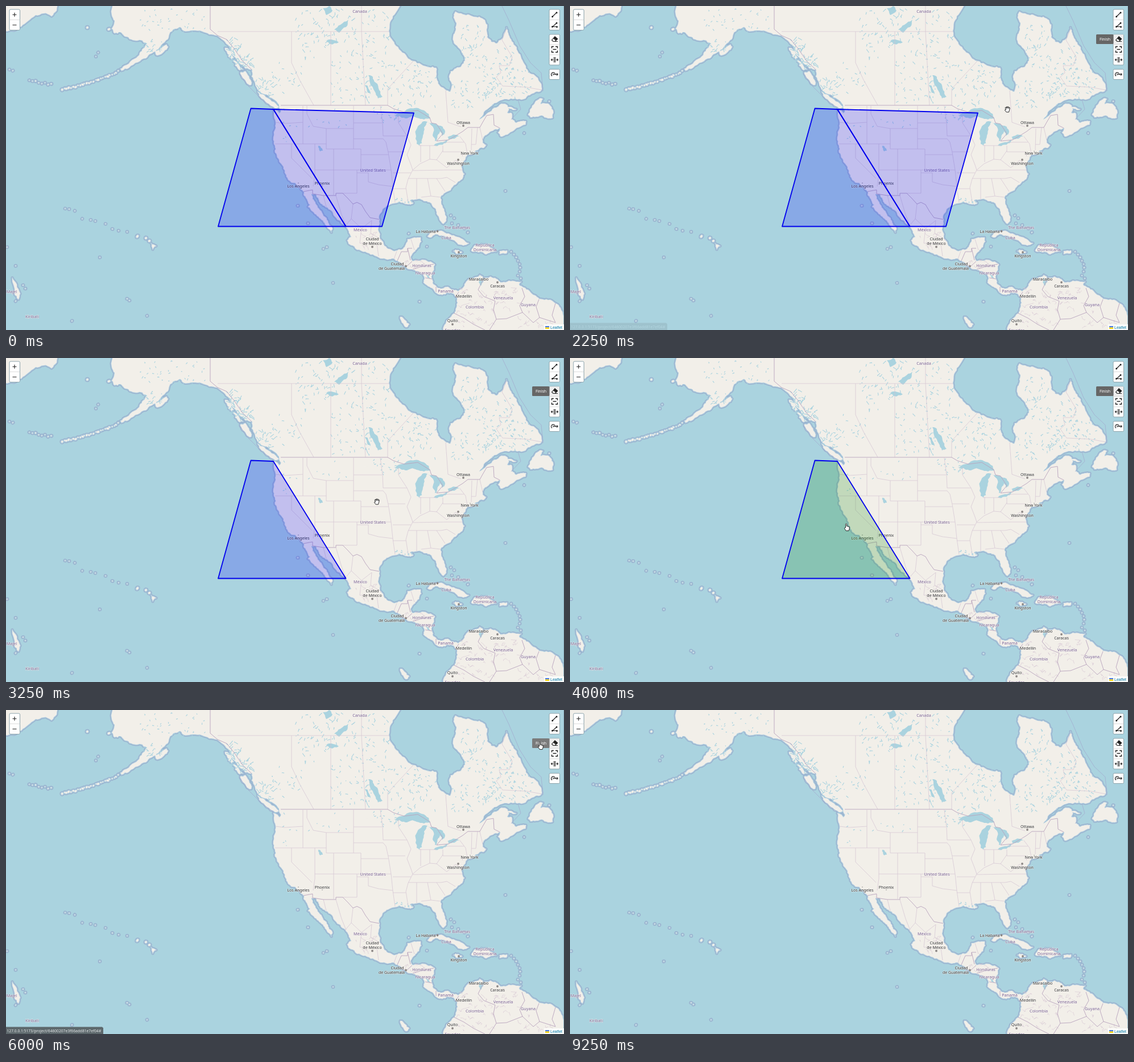
Animation, 981 px wide and 571 px high, one loop 9500 ms. Source, as an HTML page:

```html
<!DOCTYPE html>
<html lang="en">
<head>
<meta charset="utf-8">
<title>Map shape eraser</title>
<style>
html, body { margin: 0; width: 100%; height: 100%; overflow: hidden; background: #aad3df; }
svg { display: block; width: 981px; height: 571px; }
text { font: 7px "Noto Sans", sans-serif; }
.label { text-anchor: middle; fill: #333; stroke: #f7f5f2; stroke-opacity: .7; stroke-width: 1.2; paint-order: stroke; }
.country { font-size: 7.2px; fill: #7b6393; }
.states { fill: none; stroke: #d3c3d2; stroke-width: .7; }
.nations { fill: none; stroke: #b8a3bd; stroke-width: .9; }
.shape { stroke: #00e; stroke-width: 1.8; fill: #00f; fill-opacity: .2; stroke-linejoin: round; }
.shape.hot { fill: #008000; }
.box { fill: #fff; stroke: #8ea4ac; stroke-width: 1; }
.split { stroke: #ccc; stroke-width: .7; }
.icon { fill: none; stroke: #222; stroke-width: 1.1; }
.hand { fill: #fff; stroke: #111; stroke-width: .9; stroke-linejoin: round; }
</style>
</head>
<body>
<svg viewBox="0 0 981 571">
<defs>
<g id="land" stroke-linejoin="round">
<!-- Siberia, Alaska, western Canada -->
<polygon points="-9,-9 92,-9 89,8 80,18 66,13 52,16 38,27 27,36 14,43 -9,46"/>
<polygon points="190,-9 186,16 191,26 186,40 191,48 201,46 208,53 217,58 229,61 240,61 247,66 241,75 235,83 226,93 212,104 201,111 203,114 216,109 232,99 246,92 255,84 265,77 272,70 280,62 286,54 291,45 298,40 306,37 310,42 322,44 333,43 348,46 361,50 374,54 385,63 394,75 400,88 409,100 421,110 433,112 432,124 438,136 445,150 458,156 470,164 480,174 483,184 650,190 650,-9"/>
<polygon points="262,80 272,74 282,68 285,72 278,80 266,87"/>
<polygon points="412,117 421,115 427,124 431,139 424,137 416,127"/>
<polygon points="442,151 454,157 467,168 480,178 473,180 458,171 447,160"/>
<polygon points="385,74 392,77 400,91 397,94 391,86"/>
<polygon points="399,95 408,101 417,112 411,113 403,105"/>
<!-- Western United States and Mexico -->
<polygon points="480,172 484,182 480,189 476,184 470,182 471,191 474,204 473,218 470,236 473,246 473,258 479,269 484,278 488,284 490,293 495,303 500,309 509,312 516,318 523,327 540,332 545,332 549,338 552,346 560,352 567,358 575,365 581,374 589,382 598,390 603,400 607,407 600,413 604,420 614,427 628,433 641,438 655,443 668,446 678,445 690,448 694,430 684,432 672,428 664,420 657,405 654,394 656,380 657,367 662,358 672,351 700,344 700,172"/>
<polygon points="516,315 522,325 524,334 530,343 535,351 531,354 539,362 547,370 555,377 561,385 566,392 572,399 574,393 568,386 564,377 557,367 550,357 544,348 539,340 537,332 541,322"/>
<!-- Central and South America -->
<polygon points="670,446 678,445 688,449 697,456 706,463 716,465 726,468 734,473 736,480 734,487 741,493 749,497 757,506 767,509 777,505 787,507 794,514 806,506 795,503 786,500 777,495 767,498 757,495 750,488 748,478 750,468 754,456 749,452 738,448 725,449 714,449 712,445 714,437 720,430 726,425 730,415 729,408 718,408 706,411 703,420 698,428 684,432 676,430"/>
<polygon points="786,503 793,514 794,523 791,533 789,541 781,549 774,556 770,564 766,580 990,580 981,550 976,536 972,528 962,521 950,517 937,516 930,510 920,502 910,496 902,491 906,486 894,485 881,486 869,487 862,481 852,477 843,479 839,487 834,486 838,477 833,474 825,478 815,481 808,488 803,497 795,503"/>
<!-- Eastern United States and Maritimes -->
<polygon points="668,352 680,347 692,345 703,349 711,350 716,347 710,343 719,341 730,341 740,344 748,348 754,356 757,366 762,376 769,384 773,380 774,371 770,358 765,346 764,337 772,329 783,321 793,312 802,305 806,296 802,288 801,279 804,274 808,267 811,262 829,257 818,257 829,254 834,250 840,250 844,245 838,241 839,233 842,228 850,222 858,218 869,215 865,223 870,230 878,227 890,221 901,214 913,209 914,203 905,203 897,206 889,199 889,189 881,188 884,182 880,174 868,174 855,182 845,190 832,200 800,175 660,172"/>
<!-- Eastern Canada -->
<polygon points="697,-9 685,12 677,25 674,40 676,56 683,67 694,79 705,90 716,97 730,103 744,108 756,109 757,120 758,131 763,141 773,148 781,151 810,150 810,215 620,190 620,-9"/>
<polygon points="781,151 783,135 779,125 782,115 791,110 801,105 807,96 803,85 795,73 787,62 787,50 791,40 792,30 787,20 790,10 800,13 812,15 822,19 832,19 842,25 846,33 845,44 846,55 853,63 863,66 872,58 876,48 880,38 883,48 888,59 895,70 901,83 908,96 914,110 924,120 935,127 940,136 942,145 938,151 930,152 921,157 910,164 895,163 880,164 866,168 852,177 840,187 832,200 800,218 774,205 772,149"/>
<polygon points="918,192 921,184 925,176 932,167 938,163 944,164 940,173 950,172 958,177 962,185 961,197 953,198 945,194 932,195 922,196"/>
<polygon points="881,179 890,179 897,182 891,183"/>
<!-- Caribbean -->
<polygon points="741,406 750,398 765,396 778,401 790,406 803,411 814,418 807,421 795,420 785,412 770,405 755,402 746,408"/>
<polygon points="818,431 824,422 836,420 848,423 858,430 862,433 850,435 842,437 834,433 822,433"/>
<polygon points="786,432 795,430 802,434 793,437"/>
<polygon points="868,432 881,431 880,436 868,437"/>
<polygon points="255,418 264,423 258,429"/>
<polygon points="693,548 702,554 709,561 703,566 696,558"/>
<polygon points="11,479 19,491 25,507 22,517 15,506"/>
</g>
</defs>
<rect width="981" height="571" fill="#aad3df"/>
<use href="#land" fill="#98accb" stroke="#98accb" stroke-width="5"/>
<use href="#land" fill="#a9c8dc" stroke="#a9c8dc" stroke-width="3"/>
<use href="#land" fill="#f2efe9"/>
<path id="specks" fill="none" stroke="#aad3df" stroke-width="1.1"/>
<path id="veins" fill="none" stroke="#d6c5d2" stroke-width=".6"/>
<g id="lakes" fill="#aad3df">
<polygon points="682,193 695,187 708,181 718,180 731,183 743,190 746,198 735,200 722,197 712,195 702,198 692,194"/>
<polygon points="722,243 720,225 724,212 732,204 741,204 735,214 733,228 731,242 726,246"/>
<polygon points="742,205 755,207 768,213 772,222 767,229 763,221 760,226 757,237 754,238 750,228 752,216"/>
<polygon points="752,246 765,240 778,236 770,242 758,247"/>
<polygon points="776,231 790,227 798,229 788,234 778,235"/>
<polygon points="637,122 645,125 650,135 656,148 662,160 654,163 648,150 640,136"/>
<polygon points="631,137 636,141 641,156 636,153"/>
<polygon points="577,42 588,33 602,24 598,37 586,47"/>
<polygon points="557,4 568,0 574,8 563,16"/>
<polygon points="560,62 572,59 585,64 570,67"/>
<polygon points="549,246 553,248 557,255 552,256"/>
<polygon points="833,478 838,486 835,493 831,487"/>
<polygon points="737,472 743,475 746,481 741,479"/>
</g>
<path class="states" d="M372 45H674M502 45V100L516 130 541 175M571 45V175M625 0V45L632 175M671 175V146L716 97M773 149 777 205 800 213M880 40 872 60 881 75 890 90 885 105H867L870 118 862 125 873 141 915 143 942 148M474 205 490 207 522 205M522 176V243M473 243H563M502 243V268L538 304M543 243V297L540 318M543 289H677M576 252V333M563 216V252M529 176V190L540 212 563 216H611M611 176V252M563 252H624V289M611 206H661M611 234H663L668 240M658 176 662 206 663 229H705M624 262H672M668 240 672 258 677 289 680 318 684 346M617 289V330H592M617 294H637V310L655 315 680 318M672 257H702M690 192V206L705 229 712 245 705 262 712 280 715 289 707 305 703 320 707 345M680 322H703M680 294H712"/>
<path class="states" d="M715 290 775 289H803M707 304H765M722 304V341M741 304 747 335 730 337M747 335 764 337M729 245V275M745 246V270M726 246H757M715 289 728 278 745 270 757 271 768 255M768 246V257H800L803 265M765 304 775 302 790 311M757 304 772 327M757 271 775 285 790 272 803 279M798 230 808 243 811 260M819 216 818 254M829 214 826 244H818M833 214 838 236M768 240H805M558 334 563 354M580 334 590 368 598 388M610 349 607 375 625 392 643 378M607 375 596 388M625 392 622 418 652 419M643 378 641 400 660 412M652 419 655 441M687 432 682 446M712 411 718 430"/>
<path class="nations" d="M359 0V41L372 52 388 59 401 75 416 97 432 112M483 175H671L681 181 700 187 724 184 745 197 748 206 757 208 768 225 757 238 778 236 790 229 803 221 812 214H833L838 205 845 193 857 191 858 210 868 215M523 327 539 324V331L558 334H580V330H592L601 339 610 349 617 346 625 350 632 362 640 373 656 376M688 449 695 433H706V427H714M706 427 711 448M703 460 714 450M715 464 735 458 752 455M737 479 749 481M756 504V495M790 513 796 504M838 484 830 500 840 512 860 520 857 535 862 552 850 571M907 497 912 512 903 528 908 540 880 551 862 552M937 517 932 530 938 549 927 558 908 540M966 524 960 545 966 558 938 549M787 541 805 550 822 561 842 571"/>
<path fill="none" stroke="#a3adcf" stroke-width=".8" d="M872 0 884 25 903 70 922 100 941 118 944 150M410 118 425 140 450 165 471 180M888 200 905 182 900 165"/>
<g id="labels"></g>
<polygon id="east" class="shape" points="470,182 717,188.500 661,388.500 597.500,388.500"/>
<polygon id="west" class="shape" points="430.500,180.500 470,182 597.500,388.500 373,388.500"/>
<path d="M980.500 0V571" stroke="#8fb3c2" stroke-width="1"/>

<rect class="box" x="6" y="6" width="18.500" height="36.500" rx="2"/>
<path class="split" d="M6 24.300H24.500"/>
<path class="icon" d="M11.500 15.300H18.500M15 11.800V18.800M11.500 33.500H18.500"/>
<rect class="box" x="955" y="6" width="18.500" height="36.500" rx="2"/>
<rect class="box" x="955" y="50" width="18.500" height="54" rx="2"/>
<rect class="box" x="955" y="111.500" width="18.500" height="18" rx="2"/>
<rect id="armed" x="955.500" y="50.500" width="17.500" height="17.500" fill="#eee"/>
<path class="split" d="M955 24.300H973.500M955 68H973.500M955 86H973.500"/>
<g class="icon">
<path d="M961 18.500 967.500 12M961 36.500 967.500 30.500M961 36.500H968"/>
<g fill="#222" stroke="none"><circle cx="960.700" cy="18.700" r="1.500"/><circle cx="968" cy="11.700" r="1.500"/><circle cx="960.500" cy="36.500" r="1.500"/><circle cx="968" cy="30" r="1.500"/><circle cx="968.500" cy="36.800" r="1.500"/></g>
<path d="M959.500 60 965 54 969.500 58 965 62.500H962ZM964 62.500H970"/>
<path fill="#222" d="M962.500 57 965 54 969.500 58 967 60.500Z"/>
<path stroke-width="1.400" d="M959.500 74.500V71.500H963M966 71.500H969.500V74.500M969.500 78.500V81.500H966M963 81.500H959.500V78.500M961.500 76.500H967.500"/>
<path d="M963.500 90V99.500M965.500 90V99.500M958.500 94.800H962M967 94.800H970.500M960.500 92.800 958.500 94.800 960.500 96.800M968.500 92.800 970.500 94.800 968.500 96.800"/>
<path d="M960 123.500A3.500 3.500 0 1 1 965.500 121.500M963 120.500H970M968 118.500 970 120.500 968 122.500M962 122V119"/>
</g>
<g id="finish"><rect id="finishBox" x="925" y="50" width="30.500" height="17" rx="1.500"/><text x="940.500" y="61.200" fill="#fff" text-anchor="middle">Finish</text></g>
<rect x="946" y="561" width="35" height="10" fill="#fff" fill-opacity=".8"/>
<path d="M948 564h7v2.500h-7z" fill="#4c7be1"/><path d="M948 566.500h7v2.500h-7z" fill="#ffd500"/>
<text x="957" y="568.700" fill="#0078a8" style="font-family:'Liberation Sans',sans-serif">Leaflet</text>
<g id="status"><path d="M0 558.500H169L171 560.500V571H0Z" fill="#5d686c"/><text x="1.500" y="568" fill="#e4e8e9" style="font-size:6.700px">127.0.0.1:5173/project/64600207e3f66add81e7ef04#</text></g>
<g id="cursor" class="hand">
<path id="pointer" d="M-2.500 1V-5.500Q-1.500 -7.200 -.5 -5.500V-1.500L.8 -1.700 1 -1.200 2.500 -1.200 2.800 -.6 4.200 -.4V3L3 6.500H-1.800L-4.300 2.500Q-4.500 .5 -2.500 1Z"/>
<path id="grab" d="M-2.500 1 -3.800 -2.500Q-3.500 -4 -2.300 -3.300L-1.500 -1.500 -1.600 -4.200Q-.8 -5.500 0 -4.200L.3 -1.800 .8 -4.300Q1.800 -5.200 2.300 -4L2.200 -1.500 3 -3Q4.200 -3.500 4.300 -2.200L3.300 2.200 2.500 5H-1.800L-4.600 1.500Q-4.600 0 -2.500 1Z"/>
</g>
</svg>
<script>
const $ = id => document.getElementById(id);
const SVG = "http://www.w3.org/2000/svg";
let seed = 11;
const rnd = () => (seed = (seed * 16807) % 2147483647) / 2147483647;
const span = (a, b) => a + rnd() * (b - a);

function add(parent, tag, attrs, text = "") {
  const el = document.createElementNS(SVG, tag);
  for (const k in attrs) el.setAttribute(k, attrs[k]);
  el.textContent = text;
  parent.append(el);
}

// Coasts get their raggedness from midpoint displacement.
function roughen(points) {
  return points.flatMap(([x, y], i) => {
    const [u, v] = points[(i + 1) % points.length];
    const k = Math.min(.2, 1.6 / (Math.hypot(u - x, v - y) + 1)) * span(-1, 1);
    return [[x, y], [(x + u) / 2 + (v - y) * k, (y + v) / 2 - (u - x) * k]];
  });
}
for (const p of document.querySelectorAll("#land polygon, #lakes polygon")) {
  const pts = p.getAttribute("points").split(" ").map(s => s.split(",").map(Number));
  p.setAttribute("points", roughen(roughen(pts)).map(q => q.map(n => n.toFixed(1))).join(" "));
}

function islet(x, y, r = .7) {
  add($("land"), "ellipse", { cx: x, cy: y, rx: r * span(1, 1.6), ry: r, transform: `rotate(${span(-60, 20)} ${x} ${y})` });
}
const dots = `104,357 111,358 121,361 134,375 149,377 157,379 175,384 187,393 198,396 213,398
  2,425 17,458 165,443 575,488 564,425 558,428 878,326 513,352 531,383 213,516 217,519 248,546
  116,555 727,521 162,82 158,89 6,112 12,114 911,224 955,168 888,433 893,438 897,443 900,449
  903,455 904,461 903,468 900,475 905,480 782,369 788,374 784,383 795,386 806,392 812,399 30,492
  34,498 17,520 708,401 740,424`;
dots.split(/\s+/).forEach(s => islet(...s.split(",").map(Number)));
[[231, 406], [246, 409], [252, 414], [143, 38], [181, 41]].forEach(p => islet(...p, 1.8));

// Aleutian chain: a shallow arc of islands.
for (let i = 0; i < 26; i++) {
  const k = i / 25;
  islet(198 - 100 * k + span(-1, 1), 115 + 46 * k - 14 * k * k + span(-1, 1), span(.8, 2));
}
for (let i = 0; i < 8; i++) islet(41 + i * 5.500, 132 + i * .9 + span(-2, 2), span(.7, 1.500));

// Lakes and fjords: x, y, width, height, count, length.
const wet = [[505, 5, 165, 85, 110, 5], [570, 85, 100, 85, 70, 4], [675, 100, 80, 75, 65, 4],
  [785, 130, 80, 50, 45, 4], [800, 30, 40, 80, 45, 4], [840, 70, 55, 90, 85, 4], [895, 110, 30, 45, 20, 4],
  [390, 60, 22, 40, 35, 7], [410, 88, 24, 20, 25, 6], [436, 125, 35, 32, 20, 6], [450, 100, 70, 60, 25, 4],
  [210, 5, 150, 45, 40, 3], [240, 62, 38, 20, 22, 4], [640, 176, 55, 30, 22, 3], [485, 180, 130, 60, 15, 3], [685, 340, 28, 8, 10, 3]];
let d = "";
for (const [x, y, w, h, n, len] of wet)
  for (let i = 0; i < n; i++)
    d += `M${span(x, x + w).toFixed(1)} ${span(y, y + h).toFixed(1)}l${span(-len, len).toFixed(1)} ${span(-len, len).toFixed(1)}l${span(-1, 1).toFixed(1)} 1`;
$("specks").setAttribute("d", d);

// Provincial boundaries in the south.
d = "";
for (const [x, y, w, h, n] of [[797, 498, 60, 66, 30], [850, 492, 50, 42, 16], [695, 448, 42, 14, 9], [612, 395, 38, 30, 8], [895, 530, 72, 38, 10]])
  for (let i = 0; i < n; i++) {
    d += `M${span(x, x + w)} ${span(y, y + h)}`;
    for (let j = 0; j < 3; j++) d += `l${span(-6, 6)} ${span(-5, 5)}`;
  }
$("veins").setAttribute("d", d);

const countries = [["Canada", 622, 12], ["United States", 645, 291.500], ["México", 623, 396.500], ["Honduras", 731, 459.500],
  ["Nicaragua", 737, 473], ["Panamá", 773, 504.500], ["Venezuela", 874, 517], ["Colombia", 824, 533], ["Guyana", 918, 528.500],
  ["Cuba", 774, 411], ["The Bahamas", 793, 392.500], ["Republica", 842, 424], ["Dominicana", 842, 431.500],
  ["Kiribati", 46, 550], ["Majel", 10, 506], ["Ecuador", 785, 574]];
const cities = [["Ottawa", 804, 207.500], ["New York", 815, 262], ["Washington", 795, 280], ["Los Angeles", 514, 320],
  ["Phoenix", 556, 315], ["Ciudad", 644, 412.500], ["de México", 644, 420.500], ["Ciudad", 688, 457], ["de Guatemala", 678, 465],
  ["Medellín", 805, 514], ["Maracaibo", 831, 484], ["Caracas", 864, 496], ["Quito", 785, 557], ["La Habana", 738, 399.500], ["Kingston", 796, 443]];
const label = cls => ([t, x, y]) => add($("labels"), "text", { class: cls, x, y }, t);
[[804, 211], [795, 271], [644, 424.500], [703, 458.500], [758.500, 397], [796, 434], [864, 487], [785, 561]]
  .forEach(([cx, cy]) => add($("labels"), "circle", { cx, cy, r: 1.9, fill: "#8c8785" }));
[[514, 312], [556, 317], [816, 256], [806, 506]].forEach(([cx, cy]) => add($("labels"), "circle", { cx, cy, r: .8, fill: "#888" }));
countries.forEach(label("label country"));
cities.forEach(label("label"));

// Cursor waypoints: time, x, y.
const path = [[250, 973, 235], [750, 967, 112], [1250, 964, 64], [1500, 964, 64], [1750, 935, 88], [2250, 769, 182],
  [2500, 652, 253], [3250, 652, 253], [4000, 487, 298], [4750, 487, 298], [5000, 545, 255], [5500, 870, 92],
  [5750, 940, 63], [6500, 940, 63], [7500, 936, 97], [8250, 498, 291], [9000, 966, 252], [9250, 966, 252]];
const fade = [[1000, 0], [1250, 1], [1750, 1], [2250, .15], [2500, 0], [5750, 0], [6000, 1], [6500, 1], [7250, 0]];

function at(keys, t) {
  const i = keys.findIndex(k => k[0] > t);
  if (i < 0) return keys[keys.length - 1].slice(1);
  if (!i) return keys[0].slice(1);
  const a = keys[i - 1], b = keys[i], k = (t - a[0]) / (b[0] - a[0]);
  return a.slice(1).map((v, j) => v + (b[j + 1] - v) * k);
}
const show = (id, on) => $(id).setAttribute("visibility", on ? "inherit" : "hidden");

function draw(now) {
  const t = Math.floor(now % 9500 / 250) * 250;
  const during = (a, b) => t >= a && t < b;
  const [x, y] = at(path, t);
  $("cursor").setAttribute("transform", `translate(${x} ${y})`);
  show("cursor", during(250, 9250));
  const pointing = during(750, 1750) || during(2500, 3250) || during(3750, 5000) || during(5750, 6500);
  show("pointer", pointing);
  show("grab", !pointing);
  show("east", t < 3000);
  show("west", t < 4750);
  $("east").classList.toggle("hot", during(2500, 3000));
  $("west").classList.toggle("hot", during(3750, 4750));
  show("finish", during(1500, 6250));
  show("armed", during(1000, 6250));
  $("finishBox").setAttribute("fill", t >= 5750 ? "#7b7b7b" : "#666");
  $("status").setAttribute("opacity", at(fade, t)[0]);
  requestAnimationFrame(draw);
}
draw(0);
</script>
</body>
</html>
```
